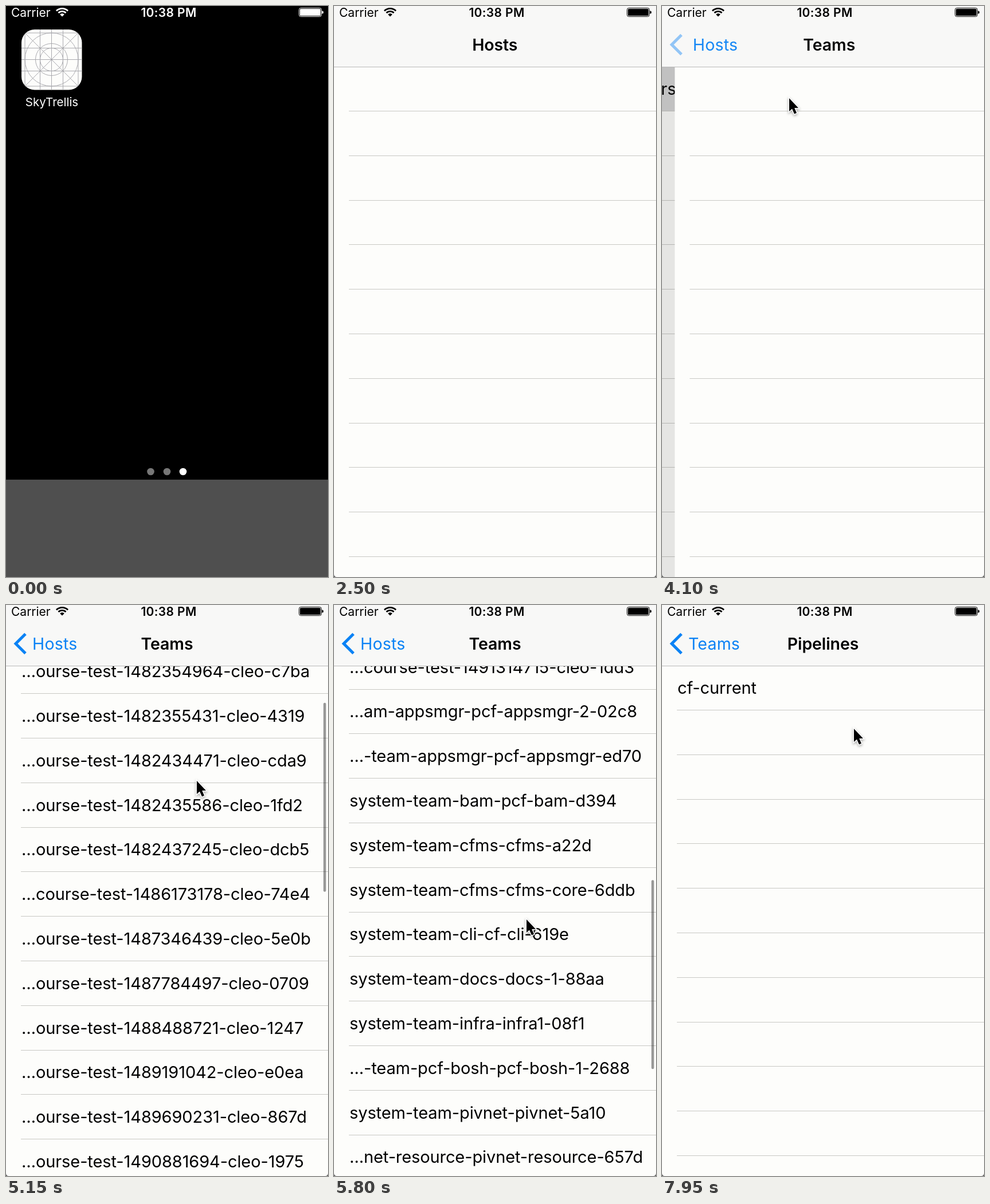
Recreate the animation shown at these times as an HTML page with a canvas. Size 562x997 px, loop 8000 ms.

```html
<!DOCTYPE html>
<html lang="en">
<head>
<meta charset="utf-8">
<title>Phone app</title>
<style>
html, body { margin: 0; width: 100%; height: 100%; overflow: hidden; background: #000; }
canvas { display: block; width: 562px; height: 997px; }
</style>
</head>
<body>
<canvas id="stage" width="562" height="997"></canvas>
<script>
const ctx = document.getElementById('stage').getContext('2d');
const W = 562, H = 997, LOOP = 8000;
const NAV_H = 106, TOP = 105.5, ROW = 77.8;
const BLUE = '#0b82f5', BAR = '#f8f8f7', PAPER = '#fdfdfb', LINE = '#c8c8c4';
const TITLES = ['Hosts', 'Teams', 'Pipelines'];

const test = (id, hash, head = '…ourse') => `${head}-test-${id}-cleo-${hash}`;
const HOSTS = ['ci.concourse.ci'];
const TEAMS = [
  'main',
  test(1482353120, '91fe'), test(1482354964, 'c7ba'), test(1482355431, '4319'),
  test(1482434471, 'cda9'), test(1482435586, '1fd2'), test(1482437245, 'dcb5'),
  test(1486173178, '74e4', '…course'), test(1487346439, '5e0b'), test(1487784497, '0709'),
  test(1488488721, '1247'), test(1489191042, 'e0ea'), test(1489690231, '867d'),
  test(1490881694, '1975'), test(1491314715, '1dd3', '…course'),
  '…am-appsmgr-pcf-appsmgr-2-02c8', '…-team-appsmgr-pcf-appsmgr-ed70',
  'system-team-bam-pcf-bam-d394', 'system-team-cfms-cfms-a22d',
  'system-team-cfms-cfms-core-6ddb', 'system-team-cli-cf-cli-619e',
  'system-team-docs-docs-1-88aa', 'system-team-infra-infra1-08f1',
  '…-team-pcf-bosh-pcf-bosh-1-2688', 'system-team-pivnet-pivnet-5a10',
  '…net-resource-pivnet-resource-657d', 'system-team-release-main-3f7c',
  'system-team-routing-main-b41e', 'system-team-runtime-main-4c1e',
  'system-team-services-main-d02a', 'system-team-storage-main-77b9',
  'system-team-tools-main-1a6f', 'system-team-tracker-main-e583',
  'system-team-web-main-90c4'
];
const PIPELINES = ['cf-current'];

const SCROLL = [[4900, 0], [5050, 70], [5150, 183], [5250, 380], [5400, 690], [5600, 960],
  [5800, 1125], [5900, 1180], [6100, 1440], [6300, 1610], [6600, 1720], [7150, 1755]];
const CURSOR_X = [[2750, 564], [3300, 222], [4150, 222], [4700, 331], [5150, 333], [5800, 336], [6300, 335]];
const CURSOR_Y = [[2750, 290], [3300, 161], [4150, 161], [4700, 491], [4950, 491], [5050, 421],
  [5150, 308], [5250, 227], [5550, 542], [5800, 549], [5900, 515], [6100, 250], [6300, 216]];

const clamp = v => Math.max(0, Math.min(1, v));
const mix = (a, b, p) => a + (b - a) * p;
const smooth = v => { v = clamp(v); return v * v * (3 - 2 * v); };

// Critically damped spring from 0 to 1, settled once it is within a pixel or so
function spring(ms, rate = 14.3) {
  const x = Math.max(0, ms) / 1000 * rate;
  const p = 1 - (1 + x) * Math.exp(-x);
  return p > 0.997 ? 1 : p;
}

// Monotone cubic through [time, value] points
function curve(t, pts) {
  const n = pts.length - 1;
  if (t <= pts[0][0]) return pts[0][1];
  if (t >= pts[n][0]) return pts[n][1];
  const slope = i => (pts[i + 1][1] - pts[i][1]) / (pts[i + 1][0] - pts[i][0]);
  const tangent = i => {
    if (i === 0 || i === n) return 0;
    const a = slope(i - 1), b = slope(i);
    return a * b > 0 ? 2 * a * b / (a + b) : 0;
  };
  let i = 0;
  while (t > pts[i + 1][0]) i++;
  const d = pts[i + 1][0] - pts[i][0], u = (t - pts[i][0]) / d;
  return mix(pts[i][1], pts[i + 1][1], u * u * (3 - 2 * u)) +
    d * u * (1 - u) * ((1 - u) * tangent(i) - u * tangent(i + 1));
}

function rect(x, y, w, h, color) {
  ctx.fillStyle = color;
  ctx.fillRect(x, y, w, h);
}

function round(x, y, w, h, r, color) {
  ctx.fillStyle = color;
  ctx.beginPath();
  ctx.roundRect(x, y, w, h, r);
  ctx.fill();
}

function text(str, x, y, size, color, { weight = 400, align = 'left', gap = 0, alpha = 1 } = {}) {
  if (alpha <= 0) return;
  ctx.save();
  ctx.globalAlpha *= alpha;
  ctx.font = `${weight} ${size}px Inter, Roboto, sans-serif`;
  ctx.letterSpacing = gap + 'px';
  ctx.textAlign = align;
  ctx.fillStyle = color;
  ctx.fillText(str, x, y);
  ctx.restore();
}

function statusBar(color) {
  text('Carrier', 9, 19, 21, color);
  text('10:38 PM', 284, 19, 21, color, { weight: 600, align: 'center', gap: 0.35 });
  ctx.strokeStyle = ctx.fillStyle = color;
  ctx.lineWidth = 2.8;
  for (const r of [14.2, 9.2]) {
    ctx.beginPath();
    ctx.arc(98, 18.5, r, -Math.PI * 0.75, -Math.PI * 0.25);
    ctx.stroke();
  }
  ctx.beginPath();
  ctx.moveTo(98, 18.5);
  ctx.arc(98, 18.5, 5.4, -Math.PI * 0.75, -Math.PI * 0.25);
  ctx.fill();
  ctx.lineWidth = 1;
  ctx.beginPath();
  ctx.roundRect(511.5, 3.5, 39, 15, 3);
  ctx.stroke();
  round(513, 5, 36, 12, 1.5, color);
  round(551.5, 8.5, 2.5, 5, [0, 2, 2, 0], color);
}

function icon() {
  ctx.save();
  ctx.beginPath();
  ctx.roundRect(27, 41, 105.5, 105.5, 23);
  ctx.clip();
  rect(27, 41, 106, 106, PAPER);
  ctx.strokeStyle = '#a9a9ae';
  ctx.lineWidth = 1;
  ctx.beginPath();
  for (const d of [-46.5, -20, 0, 20, 46.5]) {
    ctx.moveTo(79.5 + d, 41); ctx.lineTo(79.5 + d, 147);
    ctx.moveTo(27, 93.5 + d); ctx.lineTo(133, 93.5 + d);
  }
  ctx.moveTo(27, 41); ctx.lineTo(132, 146);
  ctx.moveTo(132, 41); ctx.lineTo(27, 146);
  for (const r of [46.5, 28, 20]) {
    ctx.moveTo(79.5 + r, 93.5);
    ctx.arc(79.5, 93.5, r, 0, Math.PI * 2);
  }
  ctx.stroke();
  ctx.restore();
}

function home(p) {
  rect(0, 0, W, H, '#000');
  ctx.save();
  ctx.globalAlpha = 1 - 0.8 * p;
  const zoom = 1 + 1.2 * p;
  ctx.translate(-128 * p, -64 * p);
  ctx.scale(zoom, zoom);
  if (p < 0.02) icon();
  text('SkyTrellis', 80, 175, 20.5, '#fff', { align: 'center' });
  [252.5, 281, 309].forEach((x, i) =>
    round(x - 6.3, 806.7, 12.6, 12.6, 6.3, i === 2 ? '#fff' : '#777'));
  rect(0, 827, W, 170, '#4f4f4f');
  ctx.restore();
  ctx.save();
  ctx.globalAlpha = 1 - p;
  statusBar('#fff');
  ctx.restore();
}

function list(x, rows, { offset = 0, selected = -1, dim = 0 } = {}) {
  ctx.save();
  ctx.translate(x, 0);
  rect(0, NAV_H, W, H - NAV_H, PAPER);
  const first = Math.max(0, Math.floor(offset / ROW));
  for (let i = first; i < first + 14; i++) {
    const y = TOP + i * ROW - offset;
    if (i === selected) rect(0, y, W, ROW, '#d5d5d5');
    if (rows[i]) text(rows[i], 27, y + 49.5, 29, '#000', { gap: -0.1 });
    rect(26, Math.round(y + ROW - 0.3), W - 26, 1, LINE);
  }
  if (dim > 0) rect(0, NAV_H, W, H - NAV_H, `rgba(0,0,0,${dim})`);
  ctx.restore();
}

// Bar while moving from level i to i + 1
function navBar(i, p) {
  rect(0, 0, W, NAV_H, BAR);
  rect(0, NAV_H, W, 1, '#b9b9b9');
  const title = { weight: 600, align: 'center', gap: -0.1 };
  ctx.font = '600 28.5px Inter, Roboto, sans-serif';
  const from = 281 - ctx.measureText(TITLES[i]).width / 2;
  const x = mix(from, 46, p);
  text(TITLES[i], x, 78, 28.5, '#000', { weight: 600, gap: -0.1, alpha: (1 - p) ** 3 });
  text(TITLES[i], x, 78, 28.5, BLUE, { gap: 0.2, alpha: p });
  text(TITLES[i + 1], 281 + 270 * (1 - p), 78, 28.5, '#000', { ...title, alpha: p });
  if (i > 0) text(TITLES[i - 1], 46 - 150 * p, 78, 28.5, BLUE, { gap: 0.2, alpha: (1 - p) ** 2 });
  ctx.save();
  ctx.globalAlpha *= i > 0 ? 1 : clamp((p - 0.93) / 0.07);
  ctx.strokeStyle = BLUE;
  ctx.lineWidth = 5;
  ctx.beginPath();
  ctx.moveTo(34, 50.5);
  ctx.lineTo(17, 67.5);
  ctx.lineTo(34, 84.5);
  ctx.stroke();
  ctx.restore();
  statusBar('#000');
}

function push(i, p, under, underOpts, over) {
  if (p < 1) list(-0.3 * W * p, under, { ...underOpts, dim: 0.1 * p });
  list(W * (1 - p), over);
  navBar(i, p);
}

function scrollBar(t, offset) {
  const alpha = 0.4 * clamp((t - 4900) / 100) * clamp((7250 - t) / 200);
  if (alpha > 0) round(554, 110 + offset / 3.04, 4.5, 330, 2.2, `rgba(0,0,0,${alpha})`);
}

function app(t) {
  const offset = curve(t, SCROLL);
  if (t < 3750) {
    list(0, t < 2850 ? [] : HOSTS, { selected: t >= 3650 ? 0 : -1 });
    navBar(0, 0);
  } else if (t < 4400) {
    push(0, spring(t - 3750), HOSTS, { selected: 0 }, []);
  } else if (t < 7350) {
    list(0, TEAMS, { offset, selected: t >= 7270 ? 23 : -1 });
    navBar(0, 1);
    scrollBar(t, offset);
  } else {
    push(1, spring(t - 7350), TEAMS, { offset, selected: 23 }, t < 7850 ? [] : PIPELINES);
  }
}

function launch(p) {
  home(p);
  if (p < 0.02) return;
  const bulge = 11 * p * (1 - p);
  const x = mix(27, 0, p), y = mix(41, 0, p);
  const w = mix(105.5, W, p), h = mix(105.5, H, p) + 2 * bulge;
  const fade = clamp(p / 0.25);
  if (fade < 1) {
    ctx.save();
    ctx.translate(x, y);
    ctx.scale(w / 105.5, h / 105.5);
    ctx.translate(-27, -41);
    icon();
    ctx.restore();
  }
  ctx.save();
  ctx.globalAlpha = fade;
  ctx.beginPath();
  ctx.roundRect(x, y - bulge, w, h + bulge, 23 * (1 - fade));
  ctx.clip();
  rect(x, y - bulge, w, h + bulge, BAR);
  ctx.translate(x, y);
  ctx.scale(w / W, h / H);
  app(0);
  ctx.restore();
}

function corners() {
  ctx.fillStyle = '#505050';
  for (const [x, d] of [[0, 1], [W, -1]]) {
    ctx.beginPath();
    ctx.moveTo(x, H - 5);
    ctx.quadraticCurveTo(x, H, x + 5 * d, H);
    ctx.lineTo(x, H);
    ctx.fill();
  }
}

function cursor(t) {
  if (t < 2750) return;
  ctx.save();
  ctx.translate(curve(t, CURSOR_X), curve(t, CURSOR_Y));
  ctx.beginPath();
  [[0, 0], [0, 23], [5, 18.5], [9, 27.5], [13, 25.7], [9.2, 17], [16, 17]].forEach(([x, y]) => ctx.lineTo(x, y));
  ctx.closePath();
  ctx.shadowColor = 'rgba(0,0,0,0.35)';
  ctx.shadowBlur = 4;
  ctx.shadowOffsetY = 2;
  ctx.strokeStyle = '#fff';
  ctx.lineWidth = 3;
  ctx.stroke();
  ctx.shadowColor = 'transparent';
  ctx.fillStyle = '#000';
  ctx.fill();
  ctx.restore();
}

function draw(t) {
  if (t < 1707) launch(smooth((t - 27) / 1680));
  else app(t);
  if (t > 50) corners();
  cursor(t);
}

const start = performance.now();
function tick() {
  draw((performance.now() - start) % LOOP);
  requestAnimationFrame(tick);
}
tick();
</script>
</body>
</html>
```
